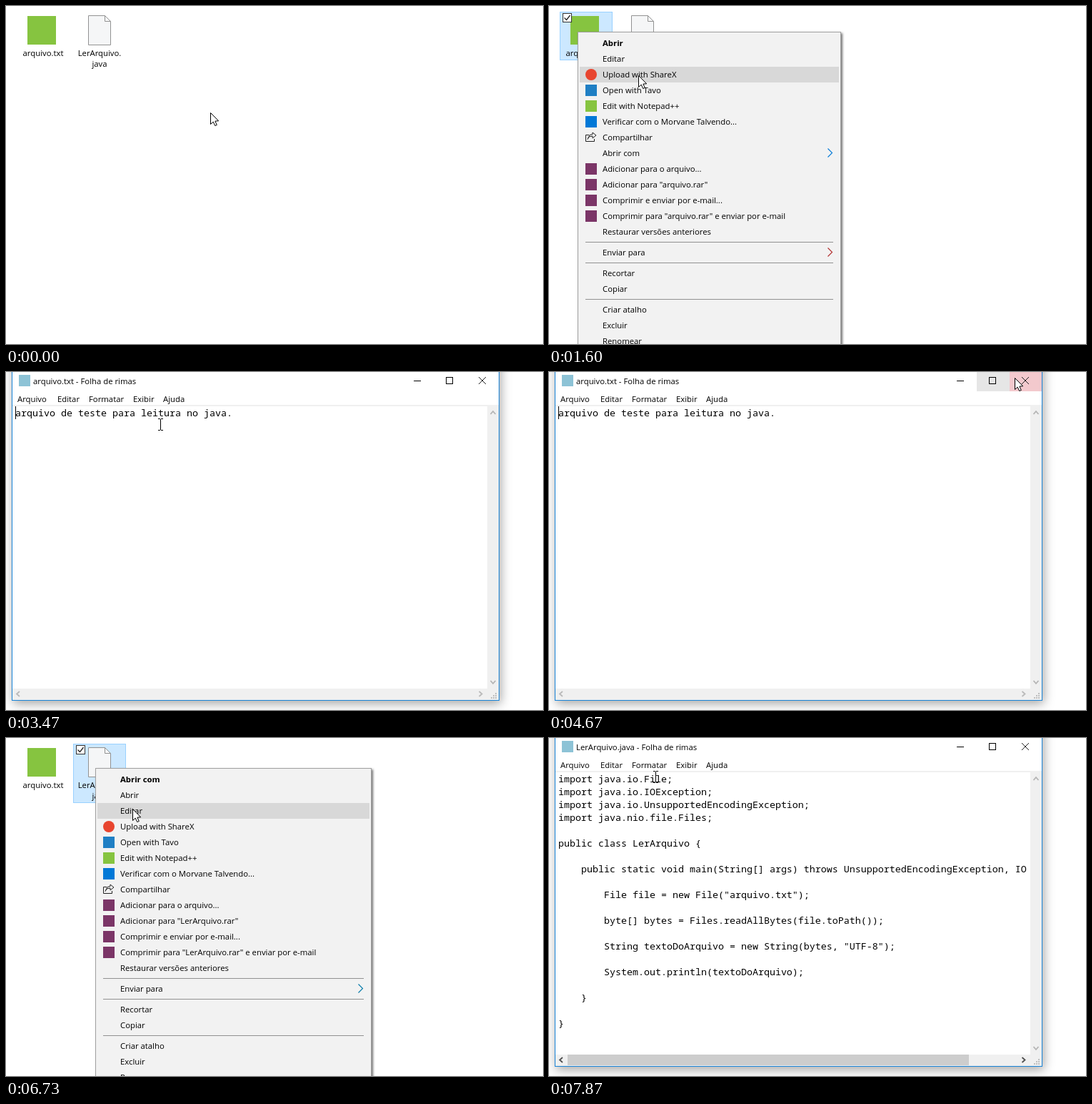
Write an HTML page with a canvas that moves like this. It is 752 px wide and 473 px high and loops after 8000 ms.

```html
<!DOCTYPE html>
<html lang="pt">
<head>
<meta charset="utf-8">
<title>Ler arquivo</title>
<style>
html, body { margin: 0; width: 100%; height: 100%; overflow: hidden; background: #fff; }
canvas { display: block; }
</style>
</head>
<body>
<canvas id="stage" width="752" height="473"></canvas>
<script>
const g = document.getElementById('stage').getContext('2d');
const LOOP = 8000, TICK = 200 / 3;
const UI = '11.33px "Open Sans", "Noto Sans", sans-serif';
const MONO = '13.33px "Noto Sans Mono", "DejaVu Sans Mono", monospace';
const APP = 'Folha de rimas';

// pointer path: time, x, y
const path = [
  [0, 286, 149], [400, 40, 36], [1067, 40, 36], [1600, 125, 97], [1667, 125, 97],
  [1867, 117, 73], [2467, 118, 73], [2600, 119, 74], [2800, 119, 74],
  [3200, 180, 77], [3667, 240, 70], [3933, 353, 81], [4267, 353, 81],
  [4667, 652, 8], [4733, 657, 11], [4867, 657, 11], [5133, 486, 70],
  [5600, 125, 42], [6067, 125, 42], [6333, 168, 78], [6400, 168, 78],
  [6733, 177, 99], [7200, 177, 104], [7400, 177, 104], [7867, 149, 54], [8000, 149, 54]
];

const javaLines = [
  'import java.io.File;',
  'import java.io.IOException;',
  'import java.io.UnsupportedEncodingException;',
  'import java.nio.file.Files;',
  '',
  'public class LerArquivo {',
  '',
  '    public static void main(String[] args) throws UnsupportedEncodingException, IO',
  '',
  '        File file = new File("arquivo.txt");',
  '',
  '        byte[] bytes = Files.readAllBytes(file.toPath());',
  '',
  '        String textoDoArquivo = new String(bytes, "UTF-8");',
  '',
  '        System.out.println(textoDoArquivo);',
  '',
  '    }',
  '',
  '}'
];

// menu entries: label, icon, arrow colour; null is a separator
const menuItems = (head, name, openArrow, sendArrow) => [
  ...head,
  ['Upload with ShareX', 'dot'],
  ['Open with Tavo', '#1f7fc4'],
  ['Edit with Notepad++', '#86c440'],
  ['Verificar com o Morvane Talvendo...', '#0078d7'],
  ['Compartilhar', 'share'],
  ...(openArrow ? [['Abrir com', '', openArrow]] : []),
  ['Adicionar para o arquivo...', '#7b3567'],
  [`Adicionar para "${name}.rar"`, '#7b3567'],
  ['Comprimir e enviar por e-mail...', '#7b3567'],
  [`Comprimir para "${name}.rar" e enviar por e-mail`, '#7b3567'],
  ['Restaurar versões anteriores'],
  null,
  ['Enviar para', '', sendArrow],
  null,
  ['Recortar'], ['Copiar'],
  null,
  ['Criar atalho'], ['Excluir'], ['Renomear']
];

const menus = [
  { x: 40, y: 36, w: 369, on: 1133, pick: 2067,
    items: menuItems([['Abrir'], ['Editar']], 'arquivo', '#0078d7', '#b02a2a') },
  { x: 125, y: 42, w: 387, on: 6067, pick: 6867,
    items: menuItems([['Abrir com'], ['Abrir'], ['Editar']], 'LerArquivo', '', '#0078a8') }
];

const clamp = v => Math.max(0, Math.min(1, v));
const ramp = (t, a, b) => clamp((t - a) / (b - a));
const ease = p => p * p * (3 - 2 * p);

function rect(x, y, w, h, color) {
  g.fillStyle = color;
  g.fillRect(x, y, w, h);
}

function frame(x, y, w, h, color) {
  g.strokeStyle = color;
  g.lineWidth = 1;
  g.strokeRect(x + .5, y + .5, w - 1, h - 1);
}

function line(points, color, width = 1) {
  g.beginPath();
  points.forEach(([x, y]) => g.lineTo(x, y));
  g.strokeStyle = color;
  g.lineWidth = width;
  g.stroke();
}

function text(s, x, y, font = UI, color = '#000', align = 'left') {
  g.font = font;
  g.fillStyle = color;
  g.textAlign = align;
  g.fillText(s, x, y);
}

function pointer(t) {
  let i = 1;
  while (i < path.length - 1 && path[i][0] < t) i++;
  const [ta, xa, ya] = path[i - 1], [tb, xb, yb] = path[i];
  const p = ease(ramp(t, ta, tb));
  return { x: Math.round(xa + (xb - xa) * p), y: Math.round(ya + (yb - ya) * p) };
}

function tile(x, h, selected, hover) {
  if (!selected && !hover) return null;
  rect(x, 8, 74, h, selected ? '#cce8ff' : '#e5f3ff');
  if (selected) frame(x, 8, 74, h, '#99d1ff');
  return () => {
    rect(x + 4, 10, 13, 13, '#fff');
    frame(x + 4, 10, 13, 13, '#333');
    if (selected) line([[x + 6.5, 16.5], [x + 9.5, 19.5], [x + 14.5, 13]], '#222', 1.3);
  };
}

function desktop(t, m) {
  const over = (x, h) => m.x >= x && m.x < x + 74 && m.y >= 8 && m.y < 8 + h;
  const free = t < 1100 || t > 5000 && t < 6060;
  const boxA = tile(15, 68, t >= 660 && t < 5660, free && over(15, 68));
  const boxB = tile(94, 83, t >= 5660, free && over(94, 83));

  rect(30, 14, 40, 40, '#86c440');
  g.beginPath();
  [[115.5, 13.5], [138.5, 13.5], [146.5, 21.5], [146.5, 54.5], [115.5, 54.5]]
    .forEach(([x, y]) => g.lineTo(x, y));
  g.closePath();
  g.fillStyle = '#f5f6f7';
  g.fill();
  g.strokeStyle = '#929292';
  g.lineWidth = 1;
  g.stroke();
  line([[138.5, 13.5], [138.5, 21.5], [146.5, 21.5]], '#929292');

  text('arquivo.txt', 52, 70, UI, '#000', 'center');
  text('LerArquivo.', 131, 70, UI, '#000', 'center');
  text('java', 131, 85, UI, '#000', 'center');
  if (boxA) boxA();
  if (boxB) boxB();
}

function menuIcon(kind, x, y) {
  if (kind === 'dot') {
    g.beginPath();
    g.arc(x, y, 8, 0, 7);
    g.fillStyle = '#e8452f';
    g.fill();
  } else if (kind === 'share') {
    line([[x - 3, y - 3.5], [x - 7.5, y - 3.5], [x - 7.5, y + 5.5], [x + 4.5, y + 5.5], [x + 4.5, y + 2]], '#222');
    line([[x - 5, y + 2.5], [x - 3, y - 1], [x + 2, y - 2], [x + 2, y + 1],
      [x + 7, y - 3], [x + 2, y - 7], [x + 2, y - 4.5], [x - 2, y - 3.5], [x - 5, y + 2.5]], '#222');
  } else {
    rect(x - 8, y - 8, 16, 16, kind);
  }
}

function menuRow(menu, item, y, first) {
  text(item[0], menu.x + 35, y + 15, first ? 'bold ' + UI : UI);
  if (item[1]) menuIcon(item[1], menu.x + 19, y + 11);
  if (item[2]) {
    const x = menu.x + menu.w - 18.5, c = y + 10.5;
    line([[x, c - 6], [x + 6, c], [x, c + 6]], item[2], 1.1);
  }
}

function drawMenu(menu, t, m) {
  if (t < menu.on - 5 || t >= menu.pick - 5) return;
  g.save();
  g.globalAlpha = clamp(.4 + (t - menu.on) / 220);
  g.save();
  g.shadowColor = 'rgba(0,0,0,.55)';
  g.shadowBlur = 3;
  g.shadowOffsetX = g.shadowOffsetY = 2;
  rect(menu.x, menu.y, menu.w, 500, '#f2f2f2');
  g.restore();
  frame(menu.x, menu.y, menu.w, 500, '#a0a0a0');
  let y = menu.y + 5;
  menu.items.forEach((item, i) => {
    if (!item) {
      rect(menu.x + 11, y + 3, menu.w - 22, 1, '#919191');
      y += 7;
      return;
    }
    if (m.y >= y && m.y < y + 22) rect(menu.x + 3, y, menu.w - 6, 22, '#d8d8d8');
    menuRow(menu, item, y, !i);
    y += 22;
  });
  g.restore();
}

// the chosen entry lingers and fades
function drawPick(menu, t) {
  const left = 1 - ramp(t, menu.pick, menu.pick + 260);
  if (t < menu.pick - 5 || left <= 0) return;
  const i = menu.items.findIndex(it => it && it[0] === 'Editar');
  const y = menu.y + 5 + 22 * i;
  g.save();
  g.globalAlpha = left;
  rect(menu.x + 3, y, menu.w - 6, 22, '#d8d8d8');
  menuRow(menu, menu.items[i], y, false);
  g.restore();
}

function chevron(x, y, dx, dy, color) {
  const a = 3.5, b = 2;
  line(dx ? [[x - dx * b, y - a], [x + dx * b, y], [x - dx * b, y + a]]
          : [[x - a, y - dy * b], [x, y + dy * b], [x + a, y - dy * b]], color, 1.8);
}

function scrollbars(thumb) {
  rect(674, 48, 16, 411, '#f0f0f0');
  rect(9, 443, 681, 16, '#f0f0f0');
  if (thumb) rect(26, 443, 562, 15, '#cdcdcd');
  const across = thumb ? '#505050' : '#bababa';
  chevron(682, 57, 0, -1, '#b4b4b4');
  chevron(682, 434, 0, 1, '#b4b4b4');
  chevron(17, 450.5, -1, 0, across);
  chevron(664.5, 450.5, 1, 0, across);
  for (let r = 0; r < 3; r++)
    for (let c = 2 - r; c < 3; c++) rect(679 + c * 3, 449 + r * 3, 2, 2, '#bfbfbf');
}

function drawWindow(t, open, loaded, second, since) {
  if (open <= 0) return;
  g.save();
  g.globalAlpha = open;
  const s = .92 + .08 * open;
  g.translate(349, 225);
  g.scale(s, s);
  g.translate(-349, -225);

  g.save();
  g.shadowColor = 'rgba(0,0,0,.36)';
  g.shadowBlur = 14;
  g.shadowOffsetX = 2;
  g.shadowOffsetY = 4;
  rect(8, -20, 683, 480, '#fff');
  g.restore();
  frame(8, -20, 683, 480, '#1883d7');

  if (t > 4590 && t < 4700) rect(599, 0, 46, 27, '#e6e6e6');
  const red = t > 4720 && t < 5000;
  if (red || t > 4660 && t < 4720) rect(645, 0, 45, 27, red ? '#e81123' : '#f3c9cd');

  rect(18, 4, 16, 16, '#8dc3d6');
  const name = !loaded ? 'Sem título' : second ? 'LerArquivo.java' : 'arquivo.txt';
  text(name + ' - ' + APP, 38, 17);
  rect(571, 12, 10, 1, '#000');
  frame(616, 7, 10, 10, '#000');
  const cross = red ? '#fff' : '#222';
  line([[662, 7], [672, 17]], cross);
  line([[672, 7], [662, 17]], cross);

  [['Arquivo', 16], ['Editar', 72], ['Formatar', 116], ['Exibir', 178], ['Ajuda', 220]]
    .forEach(([label, x]) => text(label, x, 42));
  rect(9, 46, 681, 2, '#f0f0f0');

  if (loaded) {
    scrollbars(second);
    const lines = second ? javaLines : ['arquivo de teste para leitura no java.'];
    lines.forEach((row, i) => text(row, 13, 62 + 18 * i, MONO));
    if (Math.floor((t - since + 5) / 533.4) % 2 === 0) rect(13, 48, 1, 18, '#000');
  }
  g.restore();
}

function arrow(x, y) {
  g.beginPath();
  [[0, 0], [0, 16], [3.7, 12.6], [6.2, 18], [8.8, 17], [6.4, 11.6], [11.2, 11.3]]
    .forEach(([a, b]) => g.lineTo(x + .5 + a, y + .5 + b));
  g.closePath();
  g.fillStyle = '#fff';
  g.fill();
  g.strokeStyle = '#000';
  g.lineWidth = 1;
  g.stroke();
}

function beam(x, y) {
  rect(x, y - 7, 1, 15, '#000');
  [-8, 8].forEach(d => {
    rect(x - 3, y + d, 3, 1, '#000');
    rect(x + 1, y + d, 3, 1, '#000');
  });
}

function ring(x, y, t) {
  const arc = (a, b, color, w) => {
    g.beginPath();
    g.arc(x, y, 7.6, a, b);
    g.strokeStyle = color;
    g.lineWidth = w;
    g.stroke();
  };
  g.beginPath();
  g.arc(x, y, 5.5, 0, 7);
  g.fillStyle = '#fff';
  g.fill();
  arc(0, Math.PI * 2, '#2a8fe2', 5);
  const a = t / 160;
  arc(a, a + 1.2, '#4aa6ec', 4);
}

function draw(t) {
  const m = pointer(t);
  rect(0, 0, 752, 473, '#fff');
  desktop(t, m);
  menus.forEach(menu => drawMenu(menu, t, m));

  if (t < 5100) drawWindow(t, ramp(t, 2133, 2260) * (1 - ramp(t, 4800, 4995)), t > 2325, false, 2333);
  else drawWindow(t, ramp(t, 6933, 7060), t > 7190, true, 7200);
  menus.forEach(menu => drawPick(menu, t));

  const busy = t > 2125 && t < 2325 || t > 6925 && t < 7190;
  const typing = t > 2325 && t < 4590 && m.y > 46 || t > 7190;
  (busy ? ring : typing ? beam : arrow)(m.x, m.y, t);
}

function loop() {
  const t = performance.now() % LOOP;
  draw(Math.floor((t + 4) / TICK) * TICK % LOOP);
  requestAnimationFrame(loop);
}
loop();
</script>
</body>
</html>
```
